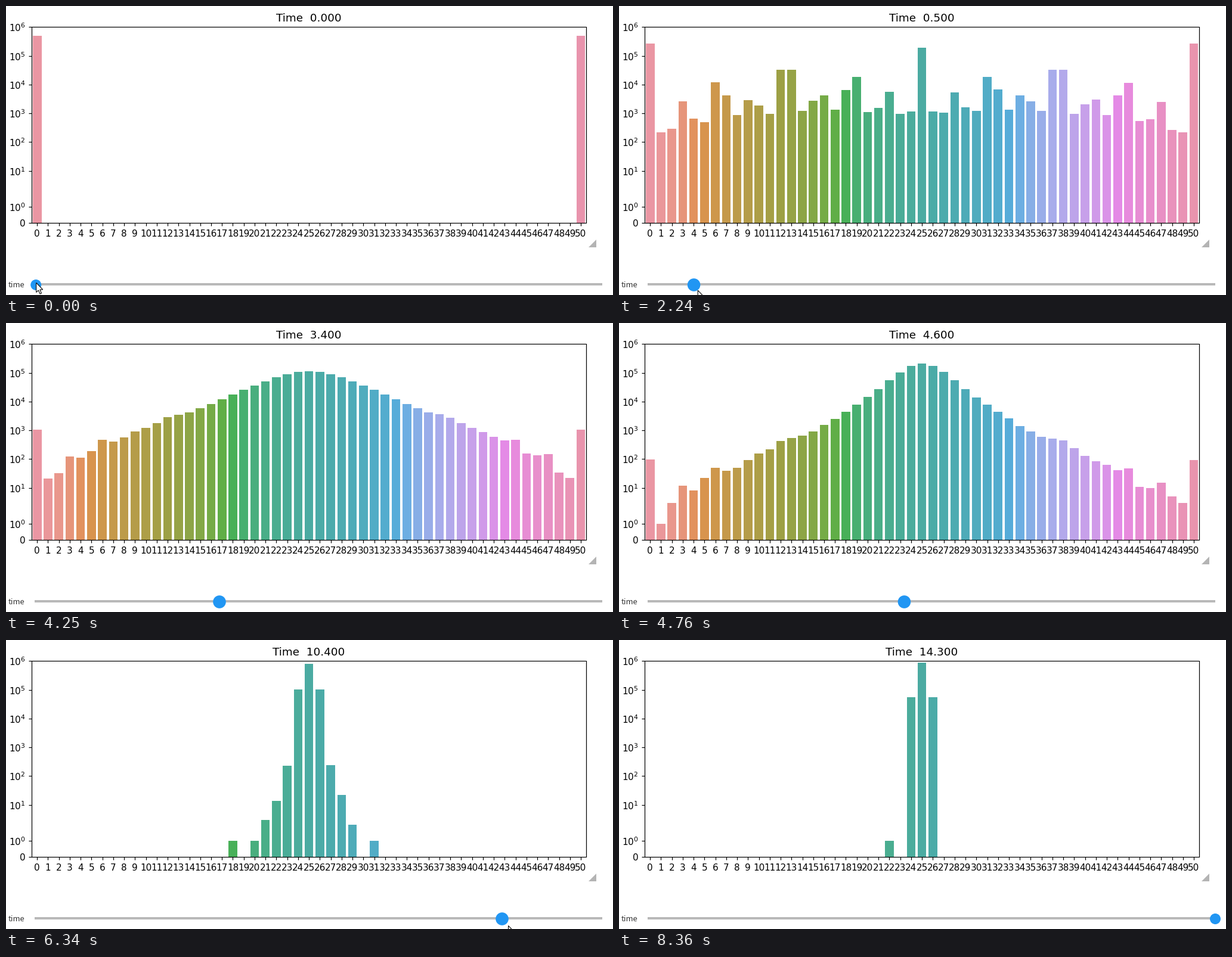
A matplotlib script for the animation above (9.21 s loop, 1018 px wide and 485 px high).

```python
import colorsys

import matplotlib.pyplot as plt
import numpy as np
from matplotlib.animation import FuncAnimation
from matplotlib.collections import PolyCollection
from matplotlib.patches import Circle, Polygon, Rectangle

W, H, DPI = 1018, 485, 110
LOOP, TICK = 9210, 30
LEFT, RIGHT, TOP, BOTTOM = 43.1, 973.1, 35.4, 364.0
N = 51
STEP = (RIGHT - LEFT) / N
AGENTS = 1_000_000

plt.rcParams["font.family"] = "DejaVu Sans"

# ---- averaging process: random pairs move to the floor and ceiling of their mean


def simulate(tenths, sub=20, seed=4):
    """Histogram of the agents' values after each 0.1 units of time."""
    rng = np.random.default_rng(seed)
    agents = np.zeros(AGENTS, np.int8)
    agents[AGENTS // 2:] = N - 1
    pairs = AGENTS // 10 // sub
    rows = [np.bincount(agents, minlength=N)]
    for _ in range(tenths):
        for _ in range(sub):
            a, b = rng.choice(AGENTS, (2, pairs), replace=False)
            total = agents[a] + agents[b]
            agents[a] = total // 2
            agents[b] = total - total // 2
        rows.append(np.bincount(agents, minlength=N))
    return rows


counts = simulate(143)

# ---- scales and colours


def bend(count):
    """Symmetric log, linear up to 2."""
    knee = 1 / 0.9
    return np.where(count <= 2, count / 2 * knee,
                    knee + np.log10(np.maximum(count, 2) / 2))


def y_of(count):
    return BOTTOM - (BOTTOM - TOP) * bend(np.asarray(count)) / bend(1e6)


def x_of(i):
    return LEFT + STEP * (i + 0.5)


XYZ_RGB = np.array([[3.2406, -1.5372, -0.4986],
                    [-0.9689, 1.8758, 0.0415],
                    [0.0557, -0.2040, 1.0570]])


def lch_linear(light, chroma, hue):
    a = np.radians(hue)
    u = chroma * np.cos(a) / (13 * light) + 0.19784
    v = chroma * np.sin(a) / (13 * light) + 0.46834
    y = ((light + 16) / 116) ** 3
    x = 9 * y * u / (4 * v)
    z = (9 * y - 15 * v * y - v * x) / (3 * v)
    return XYZ_RGB @ [x, y, z]


def husl(hue, sat=0.9 * 99, light=0.7 * 99):
    lo, hi = 0.0, 250.0
    for _ in range(30):
        mid = (lo + hi) / 2
        rgb = lch_linear(light, mid, hue)
        if rgb.min() >= 0 and rgb.max() <= 1:
            lo = mid
        else:
            hi = mid
    lin = np.clip(lch_linear(light, lo * sat / 100, hue), 0, 1)
    return np.where(lin <= 0.0031308, 12.92 * lin,
                    1.055 * lin ** (1 / 2.4) - 0.055)


def muted(rgb):
    h, l, s = colorsys.rgb_to_hls(*rgb)
    return colorsys.hls_to_rgb(h, l, 0.75 * s)


colors = [muted(husl((i / N + 0.01) % 1 * 359)) for i in range(N)]

# ---- timing: the picture changes in bursts of (start, end, steps)

bursts = [(0, 430, 2), (960, 1640, 6), (1760, 2000, 3), (2120, 3030, 8),
          (3180, 4100, 8), (4250, 5370, 10), (5490, 6340, 7),
          (6460, 7440, 8), (7570, 8360, 5)]
changes = np.concatenate([np.linspace(*b) for b in bursts])


def track(*points):
    ts, vs = zip(*points)
    return lambda t: np.interp(t, ts, vs)


clock = track((1220, 0), (1640, 0.1), (3180, 1.4), (4250, 3.4), (5490, 6.3),
              (6340, 10.4), (8360, 14.3))
knob_x = track((430, 50.2), (1640, 81), (3180, 224), (4250, 358), (5490, 658),
               (6340, 832), (7440, 984), (8360, 1000))
mouse_dx = track((430, 0), (3180, 10))
mouse_y = track((430, 464), (1640, 471), (2900, 486), (5800, 486), (6340, 479))

# ---- stage in pixel coordinates

fig = plt.figure(figsize=((W + 1e-6) / DPI, (H + 1e-6) / DPI), dpi=DPI,
                 facecolor="white")
ax = fig.add_axes([0, 0, 1, 1])
ax.set_xlim(0, W)
ax.set_ylim(H, 0)
ax.axis("off")

bars = PolyCollection([], facecolors=colors, edgecolors="none", linewidths=0,
                      antialiaseds=False, zorder=1)
ax.add_collection(bars)
ax.add_patch(Rectangle((LEFT, TOP), RIGHT - LEFT, BOTTOM - TOP, fill=False,
                       ec="black", lw=0.8, joinstyle="miter", zorder=3))

MARK = 3.5 * DPI / 72
ax.vlines(x_of(np.arange(N)), BOTTOM, BOTTOM + MARK, colors="black", lw=0.8)
for i in range(N):
    ax.text(x_of(i), BOTTOM + 2 * MARK, str(i), size=10, ha="center", va="top")

levels = [0] + [10 ** k for k in range(7)]
ax.hlines(y_of(levels), LEFT - MARK, LEFT, colors="black", lw=0.8)
for k, level in enumerate(levels):
    label = r"$\mathdefault{10^{%d}}$" % (k - 1) if level else "0"
    ax.text(LEFT - 2 * MARK, y_of(level), label, size=10, ha="right",
            va="center_baseline")

title = ax.text((LEFT + RIGHT) / 2, TOP - 6 * DPI / 72, "", size=12,
                ha="center", va="baseline")

ax.add_patch(Polygon([(990, 392), (990, 405), (977, 405)], fc="#b4b4b4", lw=0))
ax.text(4, 472, "time", size=13 * 72 / DPI, color="#333333", va="baseline",
        family=["Noto Sans CJK JP", "DejaVu Sans"])
ax.add_patch(Rectangle((48, 465), 952, 4, fc="#b9b9b9", lw=0))
knob = ax.add_patch(Circle((50, 468), 9, fc="#2196f3", lw=0, zorder=4))

ARROW = np.array([(0, 0), (0, 16), (3.7, 12.6), (6.3, 18.6), (8.8, 17.5),
                  (6.2, 11.6), (11, 11.4)])
mouse = ax.add_patch(Polygon(ARROW, closed=True, fc="white", ec="black",
                             lw=0.7, zorder=5))


def bar_box(i, count):
    x0, x1 = (round(x_of(i) + side * 0.4 * STEP) for side in (-1, 1))
    y0, y1 = round(BOTTOM), round(float(y_of(count)))
    return [(x0, y0), (x0, y1), (x1, y1), (x1, y0)]


def draw(frame):
    now = (frame + 1) * TICK - 1
    t = changes[np.searchsorted(changes, now, side="right") - 1]
    tenth = int(round(float(clock(t)) * 10))
    bars.set_verts([bar_box(i, c) for i, c in enumerate(counts[tenth])])
    title.set_text(f"Time  {tenth / 10:.3f}")

    held = 430 <= t < 8360
    knob.set_center((knob_x(t), 468))
    knob.set_radius(10.8 if held else 9)
    mouse.set_xy(ARROW + [knob_x(t) + mouse_dx(t) + 0.5, mouse_y(t) + 0.5])
    mouse.set_visible(bool(t < 8360))
    return bars, title, knob, mouse


anim = FuncAnimation(fig, draw, frames=LOOP // TICK, interval=TICK,
                     init_func=lambda: draw(0), repeat=True, repeat_delay=0,
                     blit=False, cache_frame_data=False)
plt.show()
```
